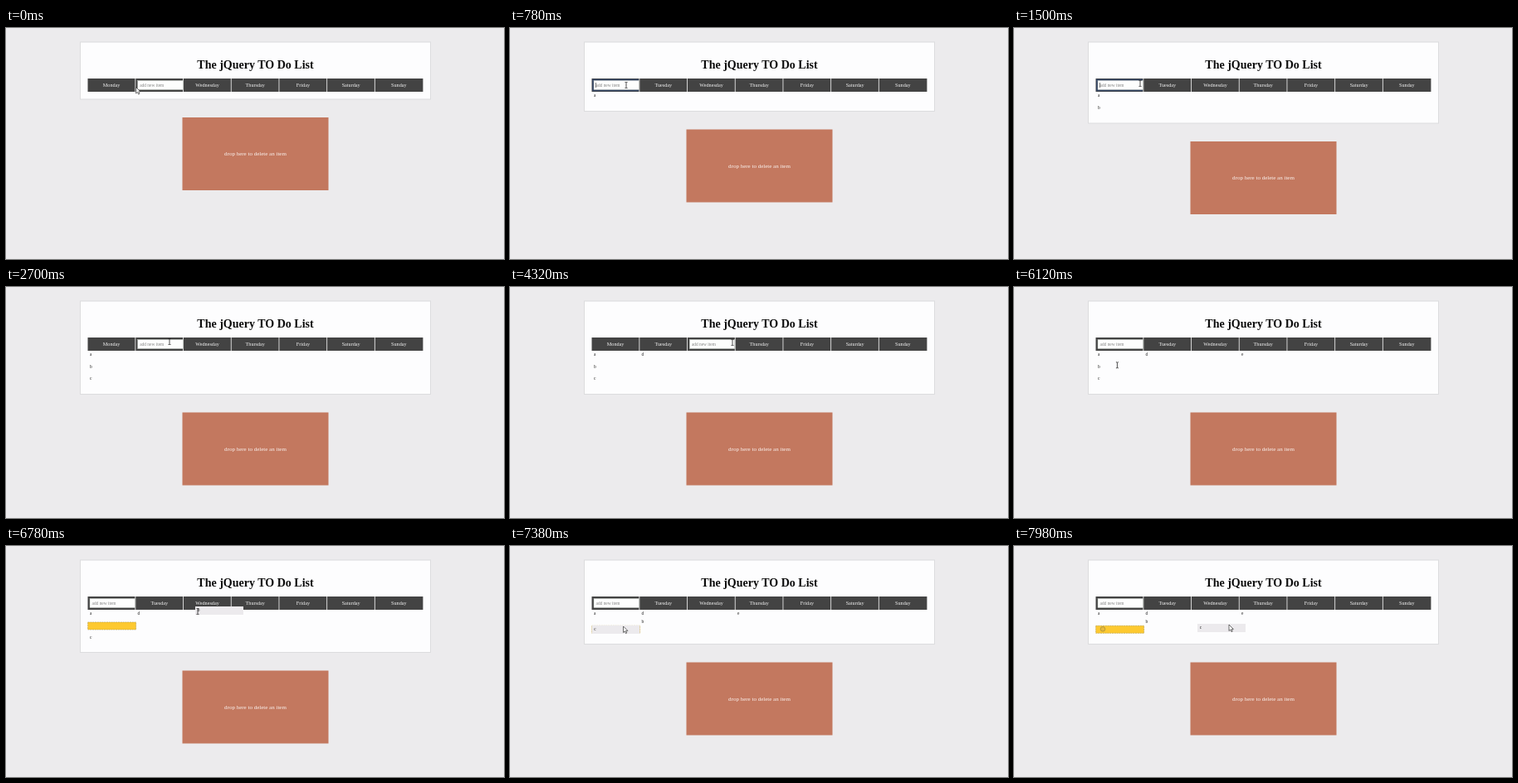
These frames come from a looping animation (600 px wide and 279 px high, 8000 ms). An HTML page:

```html
<!DOCTYPE html>
<html lang="en">
<head>
<meta charset="utf-8">
<title>To do list</title>
<style>
html, body { margin: 0; width: 100%; height: 100%; overflow: hidden; background: #ecebed; }
svg { display: block; width: 100%; height: 100%; font-family: "Liberation Serif", serif; }
</style>
</head>
<body>
<svg id="stage" viewBox="0 0 600 279"></svg>
<script>
const LOOP = 8000, STEP = 60;
const LEFT = 98.5, CELL = 57.7;
const DAYS = ["Monday", "Tuesday", "Wednesday", "Thursday", "Friday", "Saturday", "Sunday"];
const stage = document.getElementById("stage");

function add(tag, attrs, parent = stage) {
  const node = document.createElementNS("http://www.w3.org/2000/svg", tag);
  set(node, attrs);
  parent.appendChild(node);
  return node;
}
function set(node, attrs) {
  for (const key in attrs) node.setAttribute(key, attrs[key]);
}
function label(str, x, y, size, fill, more = {}) {
  const node = add("text", { x, y, "font-size": size, fill, ...more });
  node.textContent = str;
  return node;
}
const show = (node, on) => set(node, { visibility: on ? "visible" : "hidden" });
const within = (t, a, b) => t >= a && t < b;
const middle = { "text-anchor": "middle" };
const cellX = i => LEFT + i * CELL;

// Pointer path: time, x, y
const PATH = [
  [0, 156.6, 71.5], [240, 140, 69], [780, 140, 69], [1080, 152, 67], [2340, 152, 67],
  [2640, 197, 66], [3780, 197, 66], [4200, 268, 67], [4740, 268, 67], [4980, 283, 69],
  [5700, 283, 69], [6240, 101.5, 98], [6360, 101.5, 98], [6780, 231, 79],
  [7080, 160, 93], [7140, 160, 93], [7320, 136.5, 97], [7440, 136.5, 97], [7980, 259, 95]
];
const GRAB_B = 6360, DROP_B = 7140, GRAB_C = 7380;
const ADDED = { a: 780, b: 1440, c: 2100, d: 3600, e: 5580 };
const TYPED = { a: 540, b: 1020, c: 1800, d: 3300, e: 5220 };
const FOCUS = [[360, 2400], [3060, 3840], [5040, 5760]];

function pointerAt(t) {
  let i = 1;
  while (i < PATH.length - 1 && PATH[i][0] < t) i++;
  const [t0, x0, y0] = PATH[i - 1], [t1, x1, y1] = PATH[i];
  const p = Math.min(1, (t - t0) / (t1 - t0)), k = p * p * (3 - 2 * p);
  return [x0 + (x1 - x0) * k, y0 + (y1 - y0) * k];
}

add("rect", { width: 600, height: 279, fill: "#ecebed" });
const panel = add("rect", { x: 89.5, y: 17, width: 422, height: 69, fill: "#fdfdfe", stroke: "#dcdcde", "stroke-width": 1 });
label("The jQuery TO Do List", 300.5, 48.5, 14, "#0c0c0c", { ...middle, "font-weight": "bold" });
add("rect", { x: LEFT, y: 61, width: CELL * 7, height: 16, fill: "#434343" });
for (let i = 1; i < 7; i++) add("rect", { x: cellX(i) - 0.8, y: 61, width: 0.9, height: 16, fill: "#e4e4e4" });
const days = DAYS.map((d, i) => label(d, cellX(i) + CELL / 2 - 0.2, 71, 6.2, "#f4f4f4", middle));

const field = add("g", {});
const ring = add("rect", { x: 0.6, y: 61.7, width: 56, height: 14.6, fill: "#344564" }, field);
add("rect", { x: 2.5, y: 63.5, width: 54.4, height: 11, fill: "#fdfefd", stroke: "#b9c0b9", "stroke-width": 0.5 }, field);
const hint = label("add new item", 5, 70.7, 5.4, "#858585");
const typed = label("", 5, 70.7, 5.4, "#222");
const caret = add("rect", { x: 4.9, y: 66, width: 0.6, height: 6, fill: "#222" });
field.append(hint, typed, caret);

const bin = add("g", {});
add("rect", { x: 212.5, y: 0, width: 176, height: 88, fill: "#c3785f" }, bin);
bin.append(label("drop here to delete an item", 300.5, 46.4, 7, "#fbf3f0", middle));

const slot = add("rect", { x: 98.6, width: 58, height: 9, fill: "#fdc930", stroke: "#b39a48", "stroke-width": 0.6, "stroke-dasharray": "2 0.8" });
const mark = add("circle", { cx: 107, cy: 100.3, r: 2.8, fill: "#e8b93c", stroke: "#a08b3c", "stroke-width": 0.7 });
const items = {};
for (const key of "adecb") items[key] = label(key, 0, 0, 5.4, "#222");
const ghost = add("g", {});
add("rect", { width: 58, height: 10, fill: "#eceaed" }, ghost);
const ghostText = label("", 2.8, 6.3, 5.4, "#222");
ghost.append(ghostText);

const arrow = add("path", { d: "M0 0V7.5L1.8 5.9 3 8.6 4.3 8 3.1 5.4H5.4Z", fill: "#fff", stroke: "#333", "stroke-width": 0.7 });
const beam = add("path", { d: "M-1.5-3.5H-.4L0-3 .4-3.5H1.5M0-3V3M-1.5 3.5H-.4L0 3 .4 3.5H1.5", fill: "none", stroke: "#222", "stroke-width": 0.8 });

function place(key, col, y) {
  set(items[key], { x: cellX(col) + 2.4, y: y + 1.4 });
}

function draw(t) {
  const [x, y] = pointerAt(t);
  const dragB = within(t, GRAB_B, DROP_B), dragC = t >= GRAB_C, moved = t >= DROP_B;
  const hover = dragB || dragC ? 0 : Math.max(0, Math.floor((x - LEFT) / CELL));
  const focused = FOCUS.some(([a, b]) => within(t, a, b));

  days.forEach((node, i) => show(node, i !== hover));
  set(field, { transform: `translate(${cellX(hover)} 0)` });
  show(ring, focused);
  typed.textContent = Object.keys(TYPED).find(k => within(t, TYPED[k], ADDED[k])) || "";
  show(hint, !typed.textContent);
  show(caret, focused && !typed.textContent && t % 1000 >= 500);

  const rows = ["a", "b", "c"].filter(k => t >= ADDED[k]).length;
  const bottom = moved ? 118.5 : dragB ? 128.5 : 86 + rows * 14.5;
  set(panel, { height: bottom - 17 });
  set(bin, { transform: `translate(0 ${bottom + 22})` });

  place("a", 0, 82);
  place("b", moved ? 1 : 0, moved ? 91.5 : 96.5);
  place("c", 0, moved ? 100.5 : 111);
  place("d", 1, 82);
  place("e", 3, 82);
  for (const k in items) show(items[k], t >= ADDED[k] && !(k === "b" && dragB) && !(k === "c" && dragC));

  show(slot, dragB || dragC);
  set(slot, { y: dragC ? 96.3 : 92 });
  show(mark, dragC);
  show(ghost, dragB || dragC);
  ghostText.textContent = dragC ? "c" : "b";
  set(ghost, { transform: dragC ? `translate(${x - 38} ${y - 1})` : `translate(${x - 3} ${y - 6})` });

  const asArrow = t < 120 || t >= DROP_B;
  show(arrow, asArrow);
  show(beam, !asArrow);
  set(asArrow ? arrow : beam, { transform: `translate(${x} ${y})` });
}

const start = performance.now();
function tick() {
  const t = (performance.now() - start) % LOOP;
  draw(Math.floor(t / STEP) * STEP);
  requestAnimationFrame(tick);
}
tick();
</script>
</body>
</html>
```
